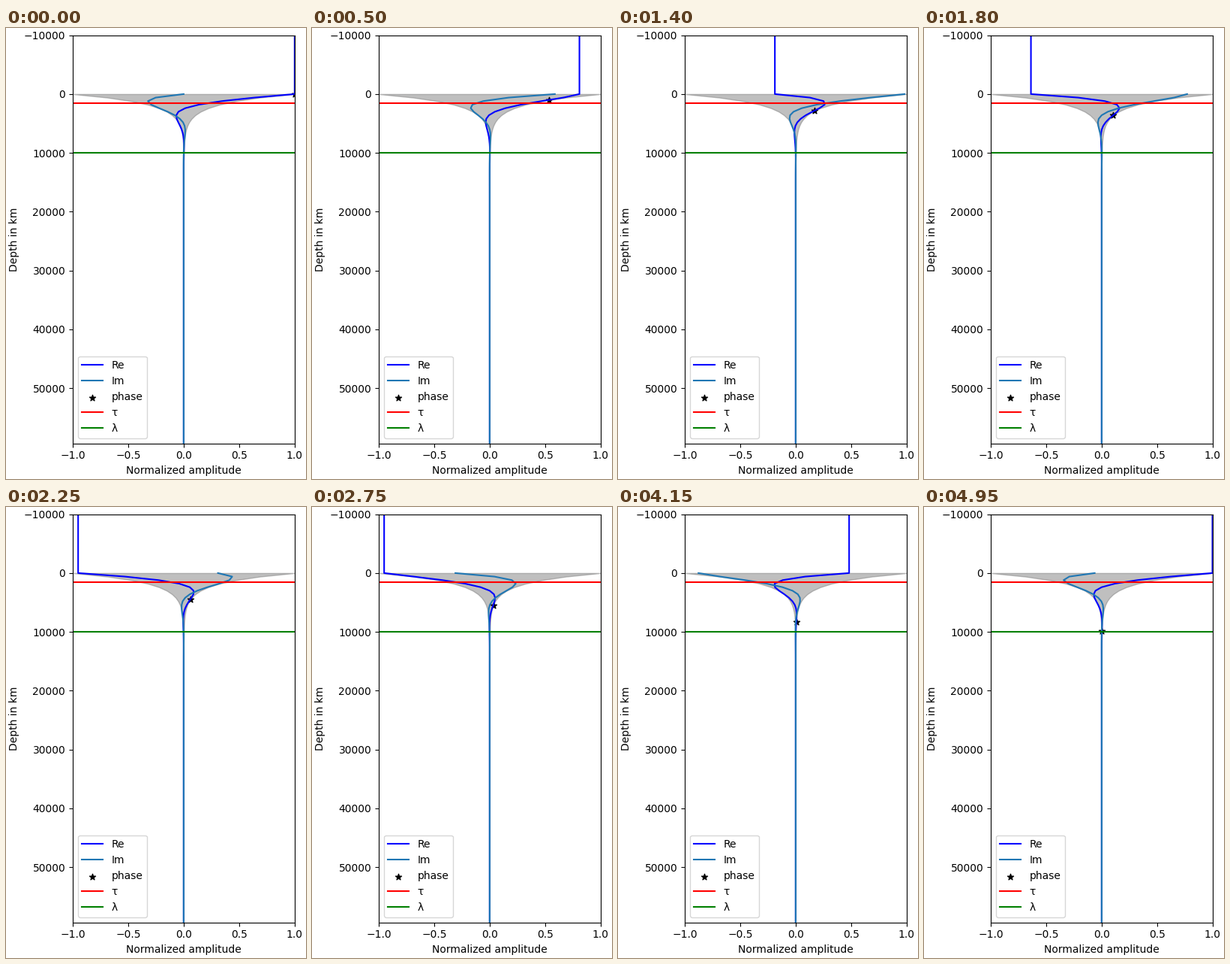
Write a matplotlib script that moves like this. It is 400x600 px and loops after 5 s.

```python
import numpy as np
import matplotlib.pyplot as plt
from matplotlib.animation import FuncAnimation

FRAMES = 100
INTERVAL = 50
WAVELENGTH = 10000
SKIN_DEPTH = WAVELENGTH / (2 * np.pi)
TOP = -10000

depth = np.arange(0, 60000, 600)
envelope = np.exp(-depth / SKIN_DEPTH)


def field(frame):
    """Complex amplitude of the damped wave at every depth."""
    phase = 2 * np.pi * frame / FRAMES
    return envelope * np.exp(1j * (phase - depth / SKIN_DEPTH))


def crest(frame):
    """Point of constant phase, sinking one wavelength per loop."""
    z = WAVELENGTH * frame / FRAMES
    return np.exp(-z / SKIN_DEPTH), z


fig, ax = plt.subplots(figsize=(4, 6), dpi=100, layout="constrained")
ax.fill_betweenx(depth, -envelope, envelope, color="gray", alpha=0.5)
re_line, = ax.plot([], [], color="blue", label="Re")
im_line, = ax.plot([], [], color="tab:blue", label="Im")
star = ax.scatter([1], [0], marker="*", color="black", label="phase")
ax.axhline(SKIN_DEPTH, color="red", label="τ")
ax.axhline(WAVELENGTH, color="green", label="λ")

ax.set_xlim(-1, 1)
ax.set_ylim(depth[-1], TOP)
ax.set_xlabel("Normalized amplitude")
ax.set_ylabel("Depth in km")
ax.legend(loc="lower left")

# Settle the layout once so the axes stay fixed
fig.draw_without_rendering()
fig.set_layout_engine("none")


def update(frame):
    wave = field(frame)
    # Above the surface the real part stays constant
    re_line.set_data(np.r_[wave.real[0], wave.real], np.r_[TOP, depth])
    im_line.set_data(wave.imag, depth)
    star.set_offsets([crest(frame)])
    return re_line, im_line, star


anim = FuncAnimation(fig, update, frames=FRAMES, interval=INTERVAL,
                     repeat=True, repeat_delay=0)
plt.show()
```
